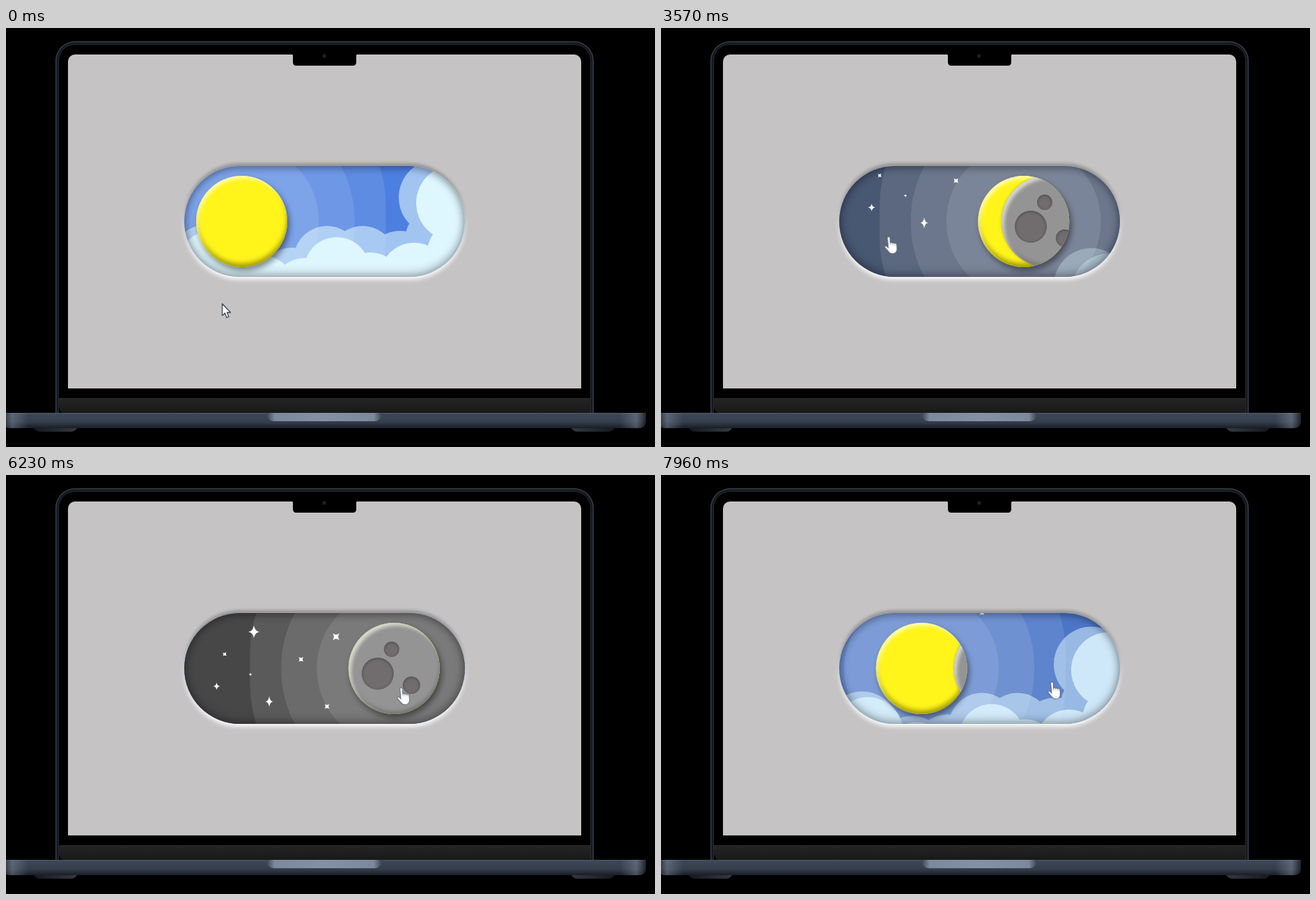
Animation of 932 by 601 pixels, one loop 8000 ms. Source, as an HTML page:

```html
<!DOCTYPE html>
<html lang="en">
<head>
<meta charset="utf-8">
<title>Day and night switch</title>
<style>
@property --x { syntax: "<length>"; inherits: true; initial-value: 338px; }
@property --moon { syntax: "<number>"; inherits: true; initial-value: 0; }
@property --night { syntax: "<number>"; inherits: true; initial-value: 0; }

html, body { margin: 0; width: 100%; height: 100%; overflow: hidden; background: #000; }
.stage {
  position: relative; width: 932px; height: 601px; overflow: hidden; background: #000;
  animation: slide 8s infinite, moon 8s infinite, sky 8s infinite;
}
svg { position: absolute; left: 0; top: 0; overflow: visible; }

.pill, .shade { position: absolute; width: 403px; height: 159px; border-radius: 80px; }
.pill {
  left: 256px; top: 198px;
  box-shadow: 0 -4px 4px rgba(0,0,0,.25), 0 4px 6px rgba(255,255,255,.94);
}
.inner { position: absolute; inset: 0; border-radius: 80px; overflow: hidden; background: #4c7fe0; }
.dark { position: absolute; inset: 0; background: #474747; opacity: var(--night); }
.shade {
  left: 0; top: 0;
  box-shadow: inset 0 3px 12px rgba(0,0,0,.3), inset 0 -4px 14px rgba(0,0,0,.28);
}
.halo, .orb {
  position: absolute; left: -321.5px; top: 14px; width: 131px; height: 131px;
  border-radius: 50%; transform: translateX(var(--x));
}
.halo {
  background: rgba(255,255,255,.27);
  box-shadow: 0 0 0 45.5px rgba(255,255,255,.1), 0 0 0 96.5px rgba(255,255,255,.1),
    0 0 0 141.5px rgba(255,255,255,.1);
}
.orb { box-shadow: 3px 5px 8px rgba(0,0,0,.45); }
.sun, .disc { position: absolute; inset: 0; border-radius: 50%; }
.sun {
  overflow: hidden; background: #fff51b;
  box-shadow: inset 3px 4px 5px rgba(254,255,239,.7), inset 0 -5px 7px #a09808;
}
.disc {
  background: #949494; transform: translateX(calc((1 - var(--moon)) * 131px));
  box-shadow: inset 4px 4px 5px rgba(254,255,239,.65), inset 0 -4px 5px #757575, 0 0 4px rgba(0,0,0,.2);
}
.disc i {
  position: absolute; border-radius: 50%; background: #716d6e;
  box-shadow: inset 0 1px 4px rgba(0,0,0,.35);
}
.clouds { transform: translateY(calc(var(--night) * 177px)); opacity: calc(1 - var(--night) * .6); }
.stars { transform: translateY(calc((var(--night) - 1) * 160px)); }

.cursor { position: absolute; left: 0; top: 0; animation: move 8s infinite ease-in-out; }
.arrow { animation: arrow 8s infinite step-end; }
.hand { animation: hand 8s infinite step-end; }

@keyframes slide {
  0%, 13.1% { --x: 338px; animation-timing-function: ease; }
  20.6% { --x: 353px; }
  37.75% { --x: 353px; animation-timing-function: cubic-bezier(.3,.1,.3,1); }
  50.25% { --x: 556.5px; }
  53.75% { --x: 556.5px; animation-timing-function: ease; }
  61%, 69.65% { --x: 567px; animation-timing-function: ease; }
  80% { --x: 556.5px; }
  91.45% { --x: 556.5px; animation-timing-function: cubic-bezier(.36,.089,.424,.761); }
  100% { --x: 368.8px; }
}
@keyframes moon {
  0%, 37.75% { --moon: 0; animation-timing-function: cubic-bezier(.42,0,.36,1); }
  50.25%, 91.45% { --moon: 1; animation-timing-function: cubic-bezier(.488,0,.532,.709); }
  100% { --moon: .109; }
}
@keyframes sky {
  0%, 37.75% { --night: 0; animation-timing-function: cubic-bezier(.42,0,.4,1); }
  50.25%, 91.45% { --night: 1; animation-timing-function: cubic-bezier(.48,0,.567,.696); }
  100% { --night: .123; }
}
@keyframes move {
  0%, 1.2% { transform: translate(310px, 395px); }
  10.5% { transform: translate(320px, 394px); }
  13.8% { transform: translate(331px, 396px); }
  20.8%, 22.5% { transform: translate(342px, 398px); }
  26%, 27.5% { transform: translate(338px, 363px); }
  32.7%, 50.5% { transform: translate(327.5px, 298px); }
  55% { transform: translate(316px, 372px); animation-timing-function: linear; }
  60.5%, 63.5% { transform: translate(297px, 404px); animation-timing-function: ease-in; }
  66.5% { transform: translate(430px, 436px); animation-timing-function: ease-out; }
  69.6%, 75.5% { transform: translate(566.5px, 253px); }
  80.5%, 83% { transform: translate(570px, 363px); }
  87.8%, 100% { transform: translate(562px, 295.5px); }
}
@keyframes arrow {
  0% { visibility: visible; }
  13.8% { visibility: hidden; }
  54% { visibility: visible; }
  68.5%, 100% { visibility: hidden; }
}
@keyframes hand {
  0% { visibility: hidden; }
  13.8% { visibility: visible; }
  54% { visibility: hidden; }
  68.5%, 100% { visibility: visible; }
}
</style>
</head>
<body>
<div class="stage">
  <svg width="932" height="601">
    <defs>
      <linearGradient id="chin" x2="0" y2="1">
        <stop stop-color="#242424"/><stop offset="1" stop-color="#191919"/>
      </linearGradient>
      <linearGradient id="base" x2="0" y2="1">
        <stop stop-color="#4b5666"/><stop offset=".12" stop-color="#3c4655"/>
        <stop offset=".6" stop-color="#353e4b"/><stop offset="1" stop-color="#191e26"/>
      </linearGradient>
      <linearGradient id="ends">
        <stop stop-color="#000" stop-opacity=".5"/><stop offset=".015" stop-color="#8b98aa" stop-opacity=".4"/>
        <stop offset=".04" stop-color="#8b98aa" stop-opacity="0"/><stop offset=".96" stop-color="#8b98aa" stop-opacity="0"/>
        <stop offset=".985" stop-color="#8b98aa" stop-opacity=".4"/><stop offset="1" stop-color="#000" stop-opacity=".5"/>
      </linearGradient>
      <linearGradient id="lip">
        <stop stop-color="#39424f"/><stop offset=".07" stop-color="#7c899c"/>
        <stop offset=".5" stop-color="#8491a4"/><stop offset=".93" stop-color="#7c899c"/><stop offset="1" stop-color="#39424f"/>
      </linearGradient>
      <linearGradient id="foot">
        <stop stop-color="#15181d"/><stop offset=".15" stop-color="#555d68"/><stop offset=".5" stop-color="#20252c"/>
        <stop offset=".85" stop-color="#555d68"/><stop offset="1" stop-color="#15181d"/>
      </linearGradient>
    </defs>
    <path d="M71 553V47a28 28 0 0 1 28-28H816a28 28 0 0 1 28 28V553z" fill="#353d47"/>
    <path d="M72.5 553V47a26.500 26.500 0 0 1 26.500-26.500H816a26.500 26.500 0 0 1 26.500 26.500V553z" fill="#15191e"/>
    <path d="M75.500 553V47a23.500 23.500 0 0 1 23.500-23.500H816a23.500 23.500 0 0 1 23.500 23.500V553z" stroke="#252b32"/>
    <path d="M89 517V48a10 10 0 0 1 10-10H816a10 10 0 0 1 10 10V517z" fill="#c5c3c4"/>
    <path d="M411 38h93q-1 0-1 2v9q0 5-5 5h-81q-5 0-5-5v-9q0-2-1-2z"/>
    <circle cx="457" cy="40" r="3" fill="#15171a"/>
    <circle cx="457" cy="40" r="1.200" fill="#292e34"/>
    <path d="M76 531H839V552H81q-5-4-5-10z" fill="url(#chin)"/>
    <path d="M76 531.5H839" stroke="#2d2d2d"/>
    <path id="slab" d="M-5 552H919V564q0 10-12 10H7q-12 0-12-10z" fill="url(#base)"/>
    <path d="M-5 552H919V564q0 10-12 10H7q-12 0-12-10z" fill="url(#ends)"/>
    <path d="M374 552H540q-1 12-11 12H385q-10 0-11-12z" fill="url(#lip)"/>
    <path d="M40 574h62q-3 5-9 5H49q-6 0-9-5zM812 574h62q-3 5-9 5H821q-6 0-9-5z" fill="url(#foot)"/>
  </svg>

  <div class="pill">
    <div class="inner">
      <div class="dark"></div>
      <div class="halo"></div>
      <svg width="403" height="159">
        <g transform="translate(-256 -198)">
          <g class="stars" id="stars" fill="#fff"></g>
          <g class="clouds" fill="#def6fe">
            <g id="back" opacity=".58"></g>
            <g id="front"></g>
          </g>
        </g>
      </svg>
      <div class="shade"></div>
      <div class="orb">
        <div class="sun">
          <div class="disc">
            <i style="left:19px;top:49.5px;width:46px;height:46px"></i>
            <i style="left:51.500px;top:27px;width:22px;height:22px"></i>
            <i style="left:78.500px;top:77px;width:25px;height:25px"></i>
          </div>
        </div>
      </div>
    </div>
  </div>

  <svg class="cursor" width="1" height="1">
    <path class="arrow" d="M.5 .5V17.500L4.300 14 7 20.500 10 19.200 7.300 13H12.500z"
      fill="#fff" stroke="#3e4654" stroke-width="1.300" stroke-linejoin="round"/>
    <g class="hand">
      <g transform="translate(-7 0) rotate(-5 9 14)" stroke="#596171">
        <path d="M5.600 3c0-2.600 3.600-2.600 3.600 0v7.200c.8-1 2.800-.8 3 .5 .9-.8 2.600-.5 2.800.8 1-.6 3 0 3 2v5c0 4-2.200 7.500-6.500 7.500-4 0-5.200-1.800-6.800-4.500L1 16.500c-1.200-2.200 1.200-3.400 2.600-1.800l2 2.300z" fill="#fff"/>
        <path d="M9.300 10v3.500M12.200 11v3M15 12v2.500" opacity=".6" fill="none" stroke-width=".8"/>
      </g>
    </g>
  </svg>
</div>

<script>
const add = (id, tag, attrs) => {
  const el = document.createElementNS("http://www.w3.org/2000/svg", tag);
  for (const key in attrs) el.setAttribute(key, attrs[key]);
  document.getElementById(id).append(el);
};
const puffs = (id, list) => list.forEach(([cx, cy, r]) => add(id, "circle", { cx, cy, r }));

puffs("back", [
  [289, 336, 54], [361, 367, 50], [411, 363, 48], [461, 332, 48],
  [512, 332, 48], [566, 343, 52], [617, 303, 44], [618, 243, 54]
]);
puffs("front", [
  [297, 341, 51], [367, 374, 48], [429, 378, 48], [475, 347, 47],
  [523, 369, 47], [586, 357, 49], [651, 322, 46], [643, 251, 54]
]);

// x, y, half width, half height, turn
[
  [356, 225, 8, 9.5, 0], [314, 257, 4, 4, 40], [302.5, 303, 5, 5.5, 0], [351, 286, 2.2, 2.2, 0],
  [378, 325, 5.5, 8, 0], [423.7, 264.5, 5, 5, 45], [474, 232, 7, 7, 45], [461, 332, 5, 5, 45]
].forEach(([x, y, w, h, turn]) => add("stars", "path", {
  d: "M0-1Q.12-.12 1 0Q.12.12 0 1Q-.12.12-1 0Q-.12-.12 0-1z",
  transform: `translate(${x} ${y}) rotate(${turn}) scale(${w} ${h})`
}));
</script>
</body>
</html>
```
